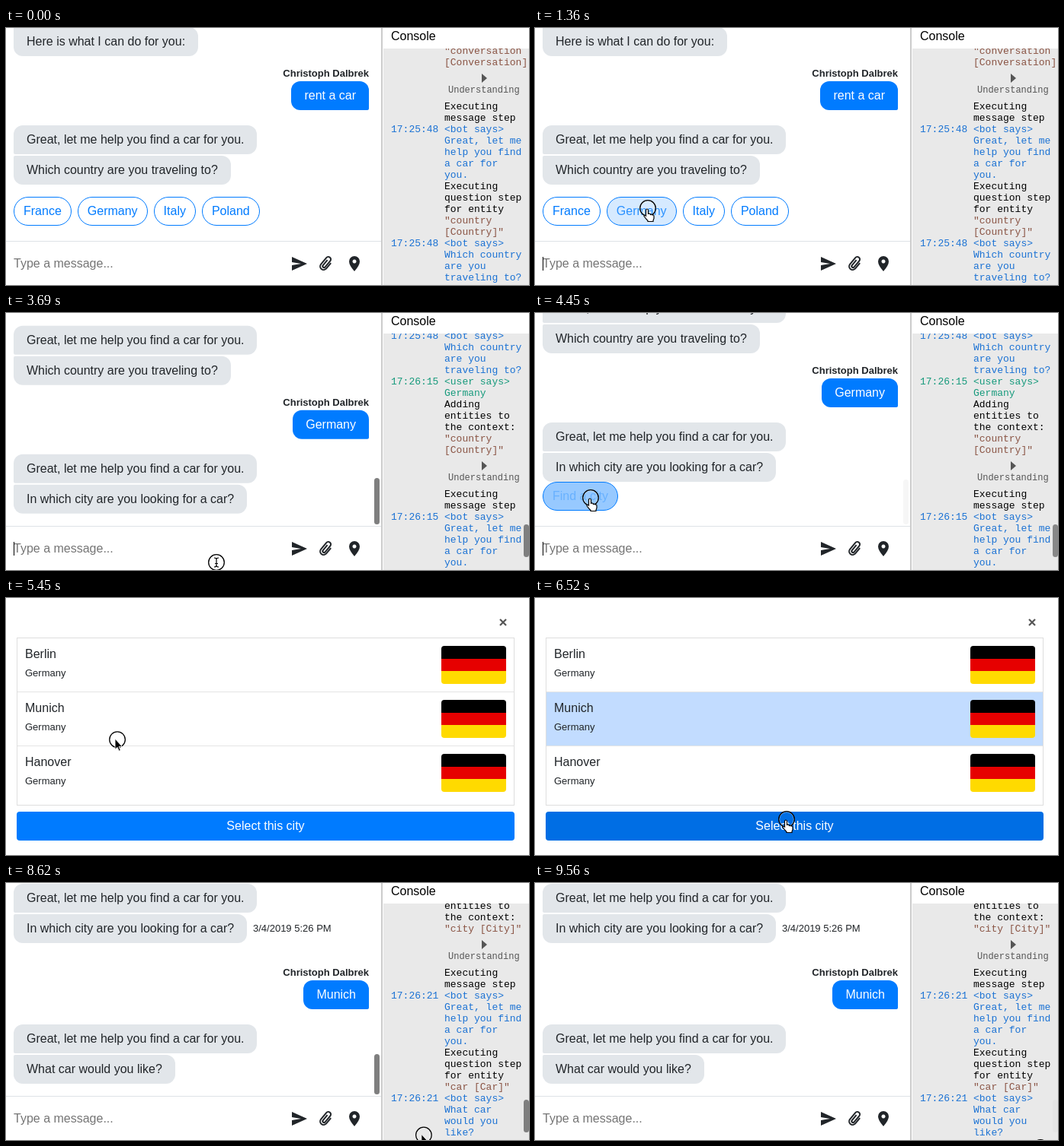
An HTML page that plays this animation: 686 by 338 pixels, repeating every 9.8 s.

```html
<!DOCTYPE html>
<html lang="en">
<head>
<meta charset="utf-8">
<title>Car rental chat</title>
<style>
html, body { margin: 0; width: 100%; height: 100%; overflow: hidden; background: #fff; }
#stage { position: relative; width: 686px; height: 338px; overflow: hidden; color: #212529;
  font: 16px/20px "Liberation Sans", Arial, sans-serif; }
#stage div, #stage svg { position: absolute; box-sizing: border-box; white-space: pre; }
#chat { left: 0; top: 0; width: 492px; height: 280px; overflow: hidden; }
#feed, #log { left: 0; top: 0; width: 100%; }
.bubble { left: 10px; height: 38px; padding: 9px 17px; border-radius: 12px; background: #e2e6ea; }
.first { border-bottom-left-radius: 2px; }
.last { border-top-left-radius: 2px; }
.me { left: auto; right: 16px; background: #007bff; color: #fff; border-bottom-right-radius: 2px; }
.name { right: 16px; font-size: 13px; font-weight: bold; }
.stamp { left: 324px; font-size: 13px; }
.typing { width: 68px; }
.typing i { position: absolute; top: 15px; width: 8px; height: 8px; border-radius: 4px; background: #212529; }
.replies { left: 10px; display: flex; gap: 8px; }
#stage .reply { position: static; height: 38px; padding: 8px 12px; border: 1px solid #007bff;
  border-radius: 19px; color: #007bff; }
#bar { left: 0; top: 280px; width: 492px; height: 1px; background: #dee2e6; }
#hint { left: 10px; top: 300px; color: #757575; }
#caret { left: 10px; top: 301px; width: 1px; height: 18px; background: #000; }
#split { left: 492px; top: 0; width: 2px; height: 338px; background: #ccc; }
#title { left: 505px; top: 1px; color: #000; }
#console { left: 495px; top: 27px; width: 191px; height: 311px; overflow: hidden; background: #e9e9e9;
  font: 13px/15px "Liberation Mono", "Courier New", monospace; }
#console .row { left: 80px; }
#console .time { left: 10px; }
.thumb { width: 7px; border-radius: 4px; background: #7f7f7f; }
#modal { left: 0; top: 0; width: 686px; height: 338px; background: #fff; }
#list { left: 14px; top: 52px; width: 653px; height: 221px; border: 1px solid #dedede; }
.city { left: 0; width: 651px; height: 71px; border-bottom: 1px solid #e4e4e4; }
.city:last-child { border: 0; }
.city div { left: 10px; top: 11px; }
#stage .city .land { top: 36px; font-size: 13px; }
#stage .city .flag { left: 556px; top: 10px; width: 85px; height: 50px; border-radius: 4px;
  background: linear-gradient(#000 33.3%, #e60000 33.3% 66.6%, #ffda00 66.6%); }
#pick { left: 14px; top: 281px; width: 653px; height: 38px; line-height: 38px; border-radius: 4px;
  text-align: center; color: #fff; }
#close { left: 646px; top: 26px; }
</style>
</head>
<body>
<div id="stage">
  <div id="chat"><div id="feed"></div><div class="thumb" id="chatThumb" style="left:483px"></div></div>
  <div id="bar"></div>
  <div id="hint">Type a message...</div>
  <div id="caret"></div>
  <svg style="left:370px;top:295px" width="100" height="30" viewBox="370 295 100 30" fill="#212529">
    <path d="M375 301l20 9-20 9v-7l12-2-12-2z"/>
    <path d="M457 320q-7-8-7-13a7 7 0 0 1 14 0q0 5-7 13zm0-15.500a2.500 2.500 0 1 0 .01 0z" fill-rule="evenodd"/>
    <path transform="translate(419.500 310) rotate(40)" fill="none" stroke="#212529" stroke-width="2"
      d="M4.500-5v9.500a4.500 4.500 0 0 1-9 0V-6.500a3.300 3.300 0 0 1 6.600 0V4a1.800 1.800 0 0 1-3.600 0V-5"/>
  </svg>
  <div id="split"></div>
  <div id="title">Console</div>
  <div id="console"><div id="log"></div><div class="thumb" id="logThumb" style="left:184px;height:43px"></div></div>
  <div id="modal">
    <svg id="close" width="12" height="12"><path d="M2 2l8 8M10 2l-8 8" stroke="#555" stroke-width="2.200"/></svg>
    <div id="list"></div>
    <div id="pick">Select this city</div>
  </div>
  <svg width="686" height="338" style="left:0;top:0">
    <g id="cursor" fill="none" stroke="#000">
      <circle r="9.500" stroke="#fff" stroke-opacity=".6"/>
      <circle r="10.300" stroke-width="1.300"/>
      <path id="arrow" fill="#000" stroke="#fff" stroke-width=".8" d="M-3-1v14l3-3 2.200 5 2-.9L2 9.300h4.400z"/>
      <path id="hand" fill="#fff" stroke-width="1.200"
        d="M-2.500 10V3q0-2 1.500-2t1.500 2v5q0-1.500 1.500-1T3.500 8.500q1.500-1 2.500.5 2-.5 2 1.500v3L7 16v1.500H0v-1q-3-3-5-6 1-2.200 2.500-.5z"/>
      <path id="beam" stroke-width="1.200" d="M-3-6q3 0 3 2v8q0 2-3 2M3-6q-3 0-3 2M3 6q-3 0-3-2M-2 1.500h4"/>
    </g>
  </svg>
</div>
<script>
const LOOP = 9800;
const $ = id => document.getElementById(id);
const clamp = v => Math.max(0, Math.min(1, v));
const smooth = v => (v = clamp(v), v * v * (3 - 2 * v));
const mix = (a, b, p) => a + (b - a) * p;

function add(parent, cls, text = '', top) {
  const el = document.createElement('div');
  el.className = cls;
  el.textContent = text;
  if (top !== undefined) el.style.top = top + 'px';
  return parent.appendChild(el);
}

// Chat feed: every item lives from one time to another
const items = [];
const put = (cls, text, top, from = 0, to = LOOP) => {
  const el = add($('feed'), cls, text, top);
  items.push({ el, from, to });
  return el;
};
const bot = (part, text, top, from) => put('bubble ' + part, text, top, from);
const user = (text, top, from) => {
  put('name', 'Christoph Dalbrek', top - 20, from);
  put('bubble me', text, top, from);
};
const typings = [];
const typing = (top, from, to) => {
  const el = put('bubble first typing', '', top, from, to);
  const dots = [17, 30, 43].map(x => {
    const dot = el.appendChild(document.createElement('i'));
    dot.style.left = x + 'px';
    return dot;
  });
  typings.push({ dots, from: from + 60 });
};
const replies = (names, top, from, to) => {
  const row = put('replies', '', top, from, to);
  return names.map(n => add(row, 'reply', n));
};

const GREAT = 'Great, let me help you find a car for you.';
bot('last', 'Here is what I can do for you:', -1);
user('rent a car', 70);
bot('first', GREAT, 128);
bot('last', 'Which country are you traveling to?', 168);
const germany = replies(['France', 'Germany', 'Italy', 'Poland'], 222, 0, 2130)[1];
user('Germany', 239, 2130);
typing(295, 2190, 3510);
bot('first', GREAT, 297, 3510);
bot('last', 'In which city are you looking for a car?', 337, 3600);
const [find] = replies(['Find a city'], 375, 3720, 7340);
put('stamp', '3/4/2019 5:26 PM', 346, 7340);
user('Munich', 424, 7340);
typing(480, 7400, 8270);
bot('first', GREAT, 482, 8270);
bot('last', 'What car would you like?', 522, 8390);

// Console log
let logY = -4;
const rows = (text, color = '#000', time) => {
  if (time) add($('log'), 'time', time, logY).style.color = '#1b72d4';
  for (const line of text.split('|')) {
    add($('log'), 'row', line, logY).style.color = color;
    logY += 15;
  }
  return $('log').lastChild;
};
const value = text => rows(text, '#8a5444');
const says = (time, text) => rows('<bot says>|' + text, '#1b72d4', time);
const heard = (time, text) => {
  rows('<user says>|' + text, '#169a7c', time);
  $('log').lastChild.parentNode.querySelectorAll('.time').forEach((el, i, all) => {
    if (i === all.length - 1) el.style.color = '#169a7c';
  });
  rows('Adding|entities to|the context:');
};
const understand = () => {
  const mark = add($('log'), '', '', logY + 7);
  mark.style.cssText += 'left:129px;border:6px solid transparent;border-left:7px solid #555;border-right:0';
  const label = add($('log'), '', 'Understanding', logY + 22);
  label.style.cssText += 'left:85px;font-size:12px;color:#555';
  logY += 43;
  rows('Executing|message step');
};
const help = time => {
  says(time, 'Great, let me|help you find|a car for|you.');
  rows('Executing|question step|for entity');
};
value('"conversation|[Conversation]');
understand();
help('17:25:48');
value('"country|[Country]"');
says('17:25:48', 'Which country|are you|traveling to?');
heard('17:26:15', 'Germany');
value('"country|[Country]"');
understand();
help('17:26:15');
value('"city [City]"');
says('17:26:15', 'In which city|are you|looking for a|car?');
heard('17:26:21', 'Munich');
value('"city [City]"');
understand();
help('17:26:21');
value('"car [Car]"');
says('17:26:21', 'What car|would you|like?');

// City list
const cities = ['Berlin', 'Munich', 'Hanover'].map((name, i) => {
  const el = add($('list'), 'city', '', i * 71);
  add(el, '', name);
  add(el, 'land', 'Germany');
  add(el, 'flag');
  return el;
});

// Key times
const scroll = [[2130, 0], [2300, 69], [3510, 69], [3870, 153], [7340, 153], [7460, 251], [8270, 251], [8600, 296]];
const path = [[540, 185, 315], [950, 148, 237], [2500, 148, 237], [2800, 175, 219], [3150, 262, 270],
  [3450, 276, 328], [4050, 276, 328], [4400, 73, 243], [5200, 73, 243], [5630, 190, 152], [6130, 190, 152],
  [6520, 330, 291], [6690, 329.5, 302], [6840, 329.5, 302], [6920, 329, 300], [8270, 329, 300], [8850, 663, 348]];
const shapes = [[0, 'beam'], [700, 'arrow'], [1300, 'hand'], [2130, 'arrow'], [3220, 'beam'], [4190, 'arrow'],
  [4330, 'hand'], [4740, 'arrow'], [6480, 'hand'], [7340, 'beam'], [8340, 'arrow']];
const blinks = [[1010, 1540], [2130, 2660], [3190, 3720], [4250, 4740]];

function at(keys, t) {
  const n = keys.findIndex(k => k[0] > t);
  if (n === 0) return keys[0].slice(1);
  if (n < 0) return keys[keys.length - 1].slice(1);
  const a = keys[n - 1], b = keys[n], p = smooth((t - a[0]) / (b[0] - a[0]));
  return a.slice(1).map((v, i) => mix(v, b[i + 1], p));
}
const within = (t, a, b) => t >= a && t < b;
const show = (el, on) => { el.style.visibility = on ? 'visible' : 'hidden'; };
const pulse = (t, on, fade, end) => within(t, on, end) ? 1 - clamp((t - fade) / (end - fade)) : 0;

function fill(el, p) {
  el.style.background = `rgba(0,123,255,${p})`;
  el.style.color = `rgb(${255 * p},${mix(123, 255, p)},255)`;
}

function draw(t) {
  for (const { el, from, to } of items) el.style.display = within(t, from, to) ? '' : 'none';
  for (const { dots, from } of typings) dots.forEach((dot, i) => {
    const phase = (t - from) / 1000 - i * .25;
    const turn = phase < 0 ? 0 : phase % 1;
    dot.style.opacity = .4 + (turn < .5 ? .18 * Math.sin(turn * 2 * Math.PI) : 0);
  });

  const [y] = at(scroll, t);
  $('feed').style.transform = `translateY(${-y}px)`;
  fill(germany, smooth((t - 1310) / 200));
  germany.style.boxShadow = t >= 1890 ? '0 0 0 3.2px rgba(0,123,255,.5)' : 'none';
  fill(find, smooth((t - 4372) / 180));

  const size = mix(64, 53, clamp((y - 69) / 182));
  $('chatThumb').style.top = 278 - size + 'px';
  $('chatThumb').style.height = size + 'px';
  $('chatThumb').style.opacity = pulse(t, 2130, 4250, 4465) + pulse(t, 7400, 9200, 9420);

  const jump = t < 3690 ? 0 : t < 8560 ? 253 : 746;
  $('log').style.transform = `translateY(${-jump}px)`;
  $('logThumb').style.top = (jump > 253 ? 258 : 251) + 'px';
  $('logThumb').style.opacity = pulse(t, 3690, 4440, 4570) + pulse(t, 8560, 9340, 9570);

  show($('caret'), blinks.some(b => within(t, ...b)));
  $('modal').style.opacity = t < 6000 ? clamp((t - 4710) / 90) : clamp((7350 - t) / 90);
  cities[1].style.background = t >= 5930 ? '#c2dcff' : 'none';
  const hover = smooth((t - 6400) / 120);
  $('pick').style.background = `rgb(0,${mix(123, 110, hover)},${mix(255, 228, hover)})`;

  const [cx, cy] = at(path, t);
  const shape = shapes.filter(s => s[0] <= t).pop()[1];
  $('cursor').setAttribute('transform', `translate(${cx} ${cy})`);
  $('cursor').style.display = t >= 540 ? '' : 'none';
  for (const id of ['arrow', 'hand', 'beam']) $(id).style.display = id === shape ? '' : 'none';
}

const start = performance.now();
function tick() {
  draw((performance.now() - start) % LOOP);
  requestAnimationFrame(tick);
}
tick();
</script>
</body>
</html>
```
